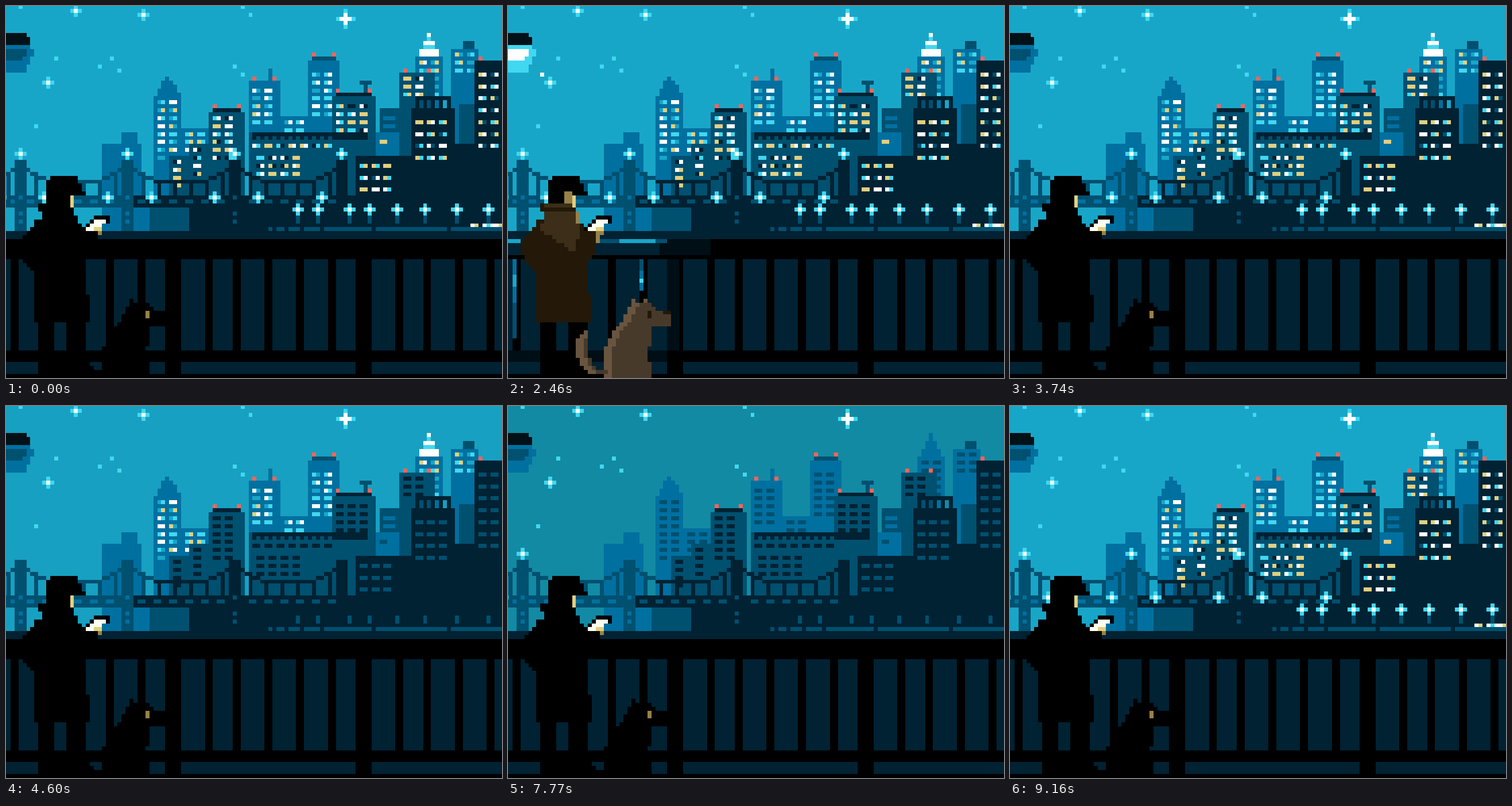
Write an HTML page with a canvas that moves like this. It is 864 px wide and 648 px high and loops after 9320 ms.

```html
<!DOCTYPE html>
<html lang="en">
<head>
<meta charset="utf-8">
<title>Night skyline</title>
<style>
html, body { margin: 0; width: 100%; height: 100%; overflow: hidden; background: #000; }
canvas { display: block; }
</style>
</head>
<body>
<canvas width="864" height="648"></canvas>
<script>
const ctx = document.querySelector('canvas').getContext('2d');
const LOOP = 9320, CELL = 6.91;
const BLUE = '#0070a0', TEAL = '#005070', NAVY = '#002233', BLACK = '#000';
const CYAN = '#40d8f0', SKY = '#18a6c8', WHITE = '#fff', YELLOW = '#e0d080', RED = '#ff6458';
const TAN = '#978148', COAT = '#241808', COAT_LIGHT = '#3c2e18', FUR = '#483a2a', FUR_LIGHT = '#69553f';
const DARKER = { [BLUE]: TEAL, [TEAL]: NAVY, [NAVY]: TEAL };

const between = (t, from, to) => t >= from && t < to;
const clamp = v => Math.min(1, Math.max(0, v));
const mix = (a, b, p) => a + (b - a) * p;
const random = (x, y) => {
  const v = Math.sin(x * 12.9898 + y * 78.233) * 43758.5453;
  return v - Math.floor(v);
};

// All art sits on a grid of square cells.
function paint(color, col, row, w = 1, h = 1) {
  const px = c => Math.round(c * CELL + 1), py = r => Math.round(r * CELL - 1.5);
  ctx.fillStyle = color;
  ctx.fillRect(px(col), py(row), px(col + w) - px(col), py(row + h) - py(row));
}
function glint(x, y) {
  paint(CYAN, x - 1, y, 3);
  paint(CYAN, x, y - 1, 1, 3);
  paint(WHITE, x, y);
}
// Fills rows between key rows [row, left, right]; edge limits the fill to a left rim.
function shape(color, keys, edge = Infinity) {
  keys.forEach(([row, left, right], i) => {
    const [nextRow, nextLeft, nextRight] = keys[i + 1] || [row + 1, left, right];
    for (let y = row; y < nextRow; y++) {
      const p = (y - row) / (nextRow - row);
      const l = Math.round(mix(left, nextLeft, p)), r = Math.round(mix(right, nextRight, p));
      paint(color, l, y, Math.min(edge, r - l));
    }
  });
}

function drawSky(t) {
  const dusk = t < 7000 ? clamp((t - 4340) / 1160) : clamp((9160 - t) / 1390);
  const level = Math.round(dusk * 10) / 10;
  ctx.fillStyle = `rgb(${mix(24, 18, level)}, ${mix(166, 138, level)}, ${mix(200, 164, level)})`;
  ctx.fillRect(0, 0, 864, 648);
  for (const [x, y] of [[3, 0], [59, 0], [61, 2], [12, 13], [23, 15], [26, 13], [28, 16], [57, 15], [59, 17], [7, 30]])
    paint(CYAN, x, y);
  glint(17, 1);
  glint(34, 2);
  glint(10, 19);
  paint(CYAN, 83, 3, 5);
  paint(CYAN, 85, 1, 1, 5);
  paint(WHITE, 84, 3, 3);
  paint(WHITE, 85, 2, 1, 3);
}

// Lights sweep from left to right; distant ones go out last and come back last.
function lightsOn(t, depth, x) {
  const off = depth === 'far' ? 4780 + 5 * x : 4000 + 4 * x;
  const on = depth === 'near' ? 8340 + x : 8700 + 4 * x;
  return t < off || t >= on;
}
function glass(color, depth, x, y) {
  const tones = depth === 'far' ? [CYAN, WHITE, YELLOW, CYAN, SKY] : [WHITE, YELLOW, CYAN, YELLOW, WHITE, DARKER[color]];
  return tones[Math.floor(random(x, y) * tones.length)];
}
function building(t, depth, color, x, top, w, { base = 49, first, rows = 0, roof, beacons } = {}) {
  paint(color, x, top, w, base - top);
  if (roof) paint(DARKER[color], x + 1, top - 1, w - 2);
  if (beacons) for (const end of [x + 1, x + w - 2]) paint(RED, end, top - (roof ? 2 : 1));
  const step = color === NAVY ? 3 : 2, lit = lightsOn(t, depth, x);
  for (let y = first; y < first + rows * step; y += step)
    for (let c = x + 1; c + 2 < x + w; c += 3)
      for (const pane of [c, c + 1])
        paint(lit ? glass(color, depth, pane, y) : DARKER[color], pane, y);
}

function drawFarCity(t) {
  const far = (...args) => building(t, 'far', BLUE, ...args);
  far(29, 32, 4);
  far(24, 35, 10, { base: 57 });
  paint(BLUE, 24, 51, 12, 6);
  paint(TEAL, 36, 51, 10, 6);
  shape(BLUE, [[18, 40, 41], [19, 39, 42], [21, 38, 43], [23, 37, 44]]);
  far(37, 23, 7, { first: 24, rows: 8 });
  far(44, 31, 7, { first: 32, rows: 3 });
  paint(BLUE, 66, 16, 1, 3);
  far(61, 19, 8, { first: 21, rows: 5, beacons: true });
  far(69, 28, 7, { first: 29, rows: 2 });
  far(76, 14, 8, { first: 17, rows: 6, roof: true, beacons: true });

  const crown = lightsOn(t, 'far', 90) && !between(t, 4730, 9060);
  for (let y = 7; y < 13; y++) {
    const half = Math.ceil((y - 8) / 2);
    const color = !crown ? BLUE : y === 8 || y === 10 ? CYAN : WHITE;
    paint(color, 106 - half, y, 2 * half + 1);
  }
  far(103, 13, 7, { first: 14, rows: 5, base: 27 });
  paint(TEAL, 115, 9, 3, 2);
  far(112, 11, 7, { first: 12, rows: 3, base: 36 });
  paint(TEAL, 114, 25, 4, 10);
}

function drawNearCity(t) {
  building(t, 'mid', TEAL, 46, 35, 5, { first: 36, rows: 4 });
  building(t, 'mid', TEAL, 41, 38, 6, { first: 39, rows: 4 });
  building(t, 'mid', TEAL, 94, 26, 5);
  for (const y of [28, 30]) for (const x of [95, 97]) paint(BLUE, x, y, 98 - x > 1 ? 2 : 1);
  building(t, 'mid', BLUE, 93, 32, 6, { first: 34, rows: 1 });
  building(t, 'mid', TEAL, 99, 17, 9, { first: 18, rows: 3, beacons: true });

  const near = (...args) => building(t, 'near', ...args);
  near(TEAL, 51, 27, 9, { first: 28, rows: 6, roof: true, beacons: true });
  near(TEAL, 61, 32, 22, { first: 35, rows: 1 });
  building(t, 'near', TEAL, 62, 37, 14, { first: 38, rows: 3 });
  near(TEAL, 82, 23, 11, { first: 25, rows: 4, roof: true, beacons: true });
  paint(TEAL, 89, 19, 3);
  paint(TEAL, 90, 20, 1, 2);
  paint(NAVY, 62, 32, 29);
  for (let x = 62; x < 82; x += 2) paint(NAVY, x, 33);
  paint(NAVY, 82, 33, 9);

  paint(NAVY, 46, 51, 80, 8);
  paint(NAVY, 112, 35, 7, 22);
  near(NAVY, 88, 38, 18, { base: 57 });
  building(t, 'near', NAVY, 88, 39, 11, { first: 40, rows: 3, base: 57 });
  for (let x = 103; x < 112; x += 2) paint(NAVY, x, 23, 1, 3);
  paint(NAVY, 103, 23, 9);
  near(NAVY, 102, 26, 11, { first: 29, rows: 4, base: 57 });
  near(NAVY, 118, 14, 9, { first: 17, rows: 7, base: 57, beacons: true });
}

const TOWERS = [3, 30, 57, 84];
function drawBridge() {
  const shade = x => x < 32 ? TEAL : NAVY;
  paint(TEAL, -1, 48, 33, 3);
  paint(NAVY, 32, 48, 56, 3);
  for (let x = -1; x < 84; x++) {
    const gap = Math.min(...TOWERS.map(c => Math.abs(c - x)));
    const sag = Math.min(44, 40 + Math.ceil(gap / 2));
    const phase = (x + 27) % 27;
    const hanger = phase === 0 || phase > 6 && phase % 4 === 3;
    paint(x < 37 ? TEAL : NAVY, x, sag, 1, hanger ? 48 - sag : 1);
    if (x % 4 === 1) paint(x < 32 ? BLUE : TEAL, x, 49, 2);
  }
  for (const c of TOWERS) {
    paint(shade(c), c - 1, 39, 3, 18);
    if (c < 84) for (const y of [48, 52, 54]) paint(c < 32 ? BLUE : TEAL, c, y);
  }
}

const DOCK = [73, 78, 86, 91, 98, 105, 113, 121];
const LAMPS = [
  ...TOWERS.flatMap(c => [[c, 37], [c - 5, 48], [c + 6, 48]]).filter(([x]) => x < 90),
  ...DOCK.map(x => [x, 51])
].sort((a, b) => a[0] - b[0]);

function drawShore(t) {
  paint(TEAL, 66, 56);
  for (const [x, end] of [[68, 70], [71, 74], [75, 79], [80, 92], [93, 111], [112, 125]]) paint(TEAL, x, 56, end - x);
  paint(NAVY, -1, 57, 127, 2);
  for (const x of DOCK) paint(TEAL, x, 53, 1, 2);
  LAMPS.forEach(([x, y], i) => {
    const on = x > 110 ? 8660 : 7770 + 38 * Math.max(0, i - 1);
    if (!between(t, 3650 + 38 * i, on)) glint(x, y);
  });
  if (lightsOn(t, 'mid', 115))
    for (let x = 117; x < 125; x++) if (x !== 119) paint(glass(NAVY, 'near', x, 55), x, 55);
}

function drawFence(lit) {
  paint(BLACK, -1, 59, 127, 36);
  paint(NAVY, -1, 64, 127, 23);
  paint(NAVY, -1, 90, 127, 3);
  if (lit) drawRailGlow();
  for (let i = 0; i < 16; i++) {
    if (i % 6 === 5) paint(BLACK, 8 * i, 64, 4, 30);
    else paint(BLACK, 8 * i + (i && i % 6 === 0 ? 2 : 1), 64, 2, 23);
  }
  if (lit) drawPostGlow();
}
function drawRailGlow() {
  paint('#000e15', -1, 60, 52, 3);
  paint('#000e15', 40, 59, 11, 4);
  paint('#000e15', -1, 87, 43, 3);
  paint(NAVY, -1, 60, 39, 3);
  paint(TEAL, -1, 59, 41);
  paint(SKY, -1, 59, 4);
  paint(SKY, 28, 59, 9);
}
function drawPostGlow() {
  paint('#000e15', 40, 64, 3, 23);
  for (const x of [1, 33]) {
    const length = x === 1 ? 20 : 8;
    for (let y = 64; y < 64 + length; y++) {
      const glow = 1 - Math.abs(y - 69) / length;
      paint(glow > 0.9 ? SKY : glow > 0.7 ? BLUE : TEAL, x, y);
    }
  }
  paint(CYAN, 33, 69);
}

const COAT_KEYS = [
  [50, 8, 16], [53, 9, 18], [54, 7, 18], [56, 6, 20], [57, 5, 23],
  [59, 3, 22], [62, 3, 22], [64, 4, 20], [67, 7, 20], [79, 7, 21]
];
function drawMan(lit) {
  shape(BLACK, [[43, 11, 18], [44, 10, 18], [47, 10, 20], [48, 10, 16], [50, 10, 16]]);
  paint(BLACK, 8, 80, 4, 14);
  paint(BLACK, 15, 80, 5, 14);
  paint(BLACK, 8, 87, 12, 7);
  shape(lit ? COAT : BLACK, COAT_KEYS);
  if (lit) {
    shape(COAT_LIGHT, [[52, 9, 17], [56, 8, 18], [61, 15, 17]]);
    paint(COAT_LIGHT, 9, 50, 7);
    paint(TAN, 14, 47, 2, 3);
    paint(TAN, 17, 52, 1, 3);
    paint(TAN, 22, 57, 1, 3);
  }
  paint(YELLOW, 16, 48, 1, 3);
  paint(BLACK, 22, 53, 4);
  for (let i = 0; i < 3; i++) {
    paint(BLACK, 21 - i, 54 + i, i ? 4 : 5);
    paint('#fffff0', 22 - i, 54 + i, 3);
  }
  paint(YELLOW, 22, 56, 2);
  paint(TAN, 23, 57);
}

const DOG_KEYS = [
  [74, 31, 32], [75, 31, 36], [76, 30, 37], [77, 30, 41], [80, 28, 41],
  [81, 27, 36], [84, 25, 36], [87, 24, 35], [92, 24, 36], [93, 24, 36]
];
const TAIL_KEYS = [[82, 19, 20], [84, 17, 20], [88, 17, 20], [91, 19, 22], [92, 20, 25]];
function drawDog(t, lit) {
  for (const keys of [DOG_KEYS, TAIL_KEYS]) {
    shape(lit ? FUR : BLACK, keys);
    if (lit) shape(FUR_LIGHT, keys, 2);
  }
  paint(lit ? FUR_LIGHT : BLACK, 34, 74);
  if (lit) paint(COAT, 39, 77, 2);
  const blink = between(t, 6260, 6360) || between(t, 6520, 6620);
  const eye = blink ? BLACK : lit ? COAT : between(t, 3360, 3460) ? SKY : TAN;
  paint(eye, 35, 77, 1, 2);
}

function drawStreetLamp(t, lit) {
  paint('#001218', -1, 7, 6);
  paint('#001218', -1, 8, 7, 2);
  shape(lit ? CYAN : BLUE, [[10, -1, 6], [11, -1, 7], [15, -1, 5], [16, -1, 5]]);
  shape(lit ? WHITE : TEAL, [[11, -1, 5], [13, -1, 4]]);
  // A moth hops around the bulb.
  if (between(t, 460, 3560)) {
    const hop = Math.floor((t - 460) / 100) - 6;
    const x = Math.round(4 + 4 * Math.sin(0.52 + 1.9 * hop));
    const y = Math.round(16.5 + 1.5 * Math.sin(1.388 * hop - 0.25));
    paint(lit ? WHITE : TEAL, x, y);
  }
}

function draw(t) {
  // The street lamp flickers when it starts and when it dies.
  const lit = between(t, 100, 3560) && !between(t, 210, 310) && !between(t, 3360, 3460);
  drawSky(t);
  drawFarCity(t);
  drawNearCity(t);
  drawBridge();
  drawShore(t);
  drawFence(lit);
  drawMan(lit);
  drawDog(t, lit);
  drawStreetLamp(t, lit);
}

const start = performance.now();
function tick() {
  draw((performance.now() - start) % LOOP);
  requestAnimationFrame(tick);
}
tick();
</script>
</body>
</html>
```
